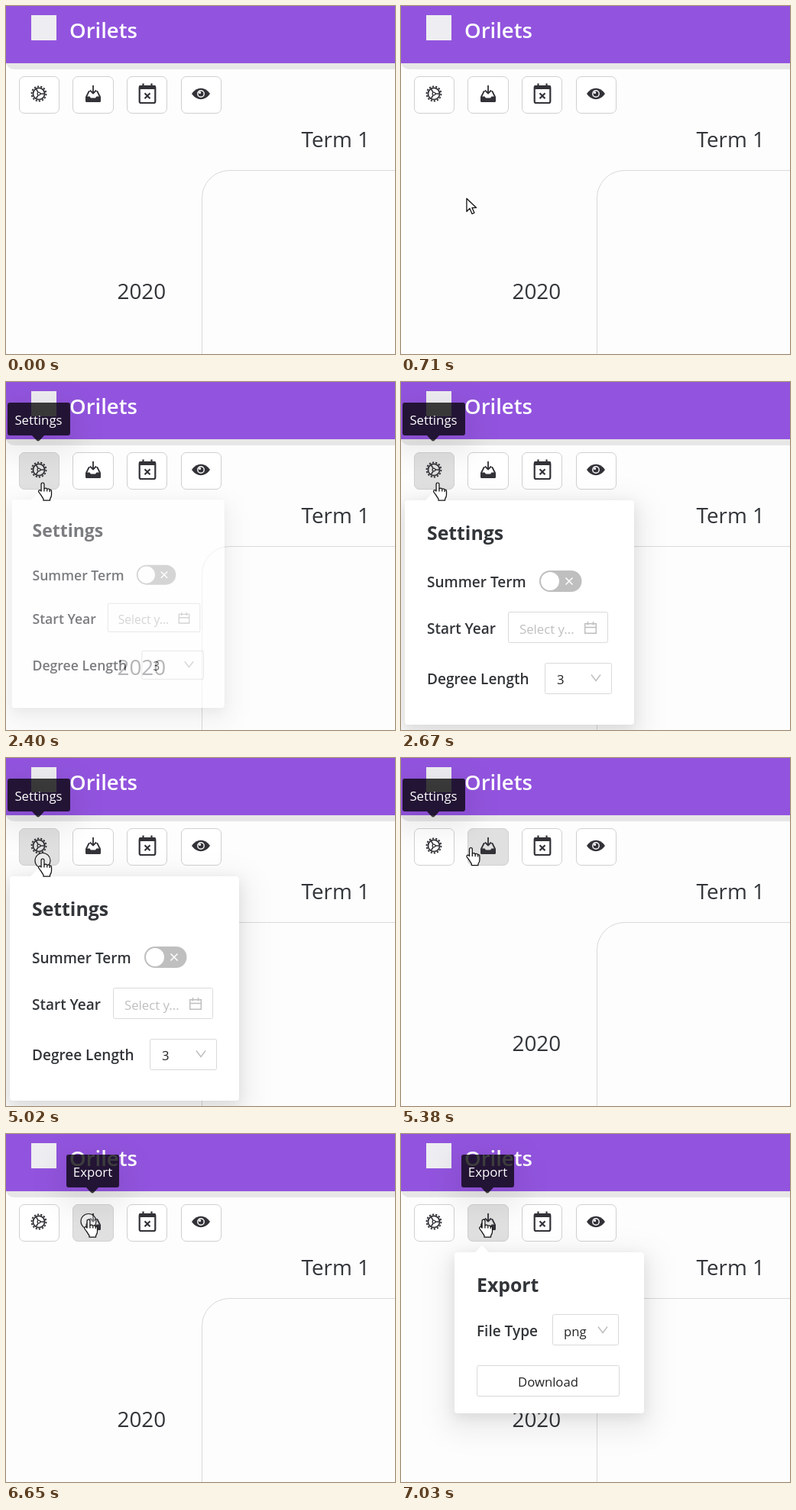
An HTML page for the animation above (8 s loop, 509 by 456 pixels).

```html
<!DOCTYPE html>
<html lang="en">
<head>
<meta charset="utf-8">
<title>Term planner</title>
<style>
  html, body { margin: 0; width: 100%; height: 100%; overflow: hidden; background: #fdfdfd; }
  svg { display: block; width: 100%; height: 100%; font-family: "Open Sans", "Noto Sans", sans-serif; }
  text { fill: #323539; }
  .brand { font-size: 27.5px; font-weight: 600; fill: #fff; }
  .grid { font-size: 27.8px; }
  .title { font-size: 24.8px; font-weight: 700; }
  .label { font-size: 19px; font-weight: 600; }
  .value { font-size: 16.7px; fill: #222; }
  .hint { font-size: 16.8px; fill: #bfbfbf; }
  .tip text { font-size: 16.8px; fill: #fff; }
  .tip path { fill: rgba(0, 0, 0, .75); }
  .shadow { fill: rgba(0, 0, 0, .065); filter: blur(17px); }
  .card { fill: #fff; filter: drop-shadow(0 5px 8px rgba(0, 0, 0, .08)); }
  .field { fill: #fff; stroke: #d9d9d9; }
  .faint { fill: none; stroke: #bdbdbd; stroke-width: 1.4; }
  .button { fill: #fff; stroke: #d0d0d0; }
  .button.hover { fill: #e0e0e0; }
  .line { fill: none; stroke: #323238; stroke-width: 2.2; }
  .thin { stroke-width: 1.8; }
  .solid { fill: #323238; }
  .cursor path { fill: #fff; stroke: #111; stroke-width: 1.3; stroke-linejoin: round; }
</style>
</head>
<body>
<svg viewBox="0 0 509 456">
  <rect width="509" height="456" fill="#fdfdfd"/>
  <rect y="55" width="540" height="28" rx="10" fill="#e7e7e7"/>
  <rect width="509" height="75" fill="#9254de"/>
  <rect x="33" y="12" width="33" height="33" fill="#eeedf1"/>
  <text class="brand" x="83" y="42">Orilets</text>

  <rect x="256.5" y="215.5" width="400" height="400" rx="36" fill="#fdfdfd" stroke="#d9d9d9"/>
  <text class="grid" x="386.5" y="185">Term 1</text>
  <text class="grid" x="145.5" y="384">2020</text>

  <g id="buttons"></g>

  <!-- settings -->
  <g class="line thin" transform="translate(43 115)">
    <circle r="7.6"/>
    <circle r="9.5" pathLength="28" stroke-dasharray="1.1 .9"/>
    <circle r="1.9" stroke-width="1.4"/>
    <path d="M2 0H7M-1 -2L-3.6 -6.2M-1 2L-3.6 6.2" stroke-width="1.6"/>
  </g>
  <!-- export -->
  <path class="line thin" d="M114 104V114M110 110.500L114 114.500L118 110.500M109.500 112H108.500L105 119M118.500 112H119.500L123 119" stroke-linejoin="round"/>
  <path class="solid" d="M104 118.500H109.500L111 120.500H117L118.500 118.500H124V124.500Q124 126 122.500 126H105.500Q104 126 104 124.500Z"/>
  <!-- clear calendar -->
  <rect class="line" x="174.700" y="105" width="20.600" height="22" rx="2"/>
  <path class="line" d="M179.500 101.500V107M190.500 101.500V107M181.500 114.200L188.500 121.200M188.500 114.200L181.500 121.200"/>
  <rect class="solid" x="174" y="104" width="22" height="5" rx="1.500"/>
  <!-- visibility -->
  <path class="solid" d="M243 115Q248 107.800 255 107.800T267 115Q262 122.300 255 122.300T243 115Z"/>
  <circle cx="255" cy="115" r="4.900" fill="#fff"/>
  <circle class="solid" cx="255" cy="115" r="3.500"/>
  <circle cx="253.600" cy="113.400" r="1.500" fill="#fff"/>

  <g id="settingsPop">
    <rect class="shadow" x="-7" y="155" width="324" height="318" rx="16"/>
    <path class="card" d="M9 155H32L41 146L50 155H301Q305 155 305 159V445Q305 449 301 449H9Q5 449 5 445V159Q5 155 9 155Z"/>
    <text class="title" x="34" y="207">Settings</text>
    <text class="label" x="34" y="269">Summer Term</text>
    <rect x="181" y="247" width="55.500" height="28" rx="14" fill="#bfbfbf"/>
    <circle cx="195" cy="261" r="12" fill="#fff"/>
    <path d="M215.500 256.500L224.500 265.500M224.500 256.500L215.500 265.500" stroke="#fff" stroke-width="1.5"/>
    <text class="label" x="34" y="330">Start Year</text>
    <rect class="field" x="140.500" y="301.500" width="130" height="40" rx="2"/>
    <text class="hint" x="155" y="330">Select y...</text>
    <path class="faint" d="M240.700 316.700H255.300V329.300H240.700ZM240.700 321.500H255.300M244.500 314V318.500M251.500 314V318.500"/>
    <text class="label" x="34" y="396">Degree Length</text>
    <rect class="field" x="188.500" y="368.500" width="87" height="40" rx="2"/>
    <text class="value" x="204" y="396">3</text>
    <path class="faint" d="M249 383.500L255 391.500L261 383.500"/>
  </g>

  <g id="exportPop">
    <rect class="shadow" x="58" y="155" width="272" height="235" rx="16"/>
    <path class="card" d="M74 155H97L106 146L115 155H314Q318 155 318 159V362Q318 366 314 366H74Q70 366 70 362V159Q70 155 74 155Z"/>
    <text class="title" x="99" y="207">Export</text>
    <text class="label" x="99" y="265">File Type</text>
    <rect class="field" x="198.500" y="236.500" width="86" height="40" rx="2"/>
    <text class="value" x="213" y="265">png</text>
    <path class="faint" d="M258 252.500L264 260.500L270 252.500"/>
    <rect class="field" x="99.500" y="303.500" width="186" height="40" rx="2"/>
    <text class="value" x="192.500" y="331" text-anchor="middle">Download</text>
  </g>

  <g class="tip" id="settingsTip">
    <rect class="shadow" x="-10" y="27" width="106" height="67" rx="16"/>
    <path d="M5 27H81Q84 27 84 30V67Q84 70 81 70H50L44 76.500Q42 78.500 40 76.500L34 70H5Q2 70 2 67V30Q2 27 5 27Z"/>
    <text x="42.500" y="56" text-anchor="middle">Settings</text>
  </g>
  <g class="tip" id="exportTip">
    <rect class="shadow" x="67" y="27" width="93" height="67" rx="16"/>
    <path d="M82 27H145Q148 27 148 30V67Q148 70 145 70H121L115 76.500Q113 78.500 111 76.500L105 70H82Q79 70 79 67V30Q79 27 82 27Z"/>
    <text x="113.500" y="56" text-anchor="middle">Export</text>
  </g>

  <g class="cursor" id="cursor">
    <circle id="ring" cy="2.500" r="10" fill="rgba(255,255,255,.35)" stroke="#222" stroke-width="1.2"/>
    <path id="arrow" d="M0 0v17l4-4l3 7l3-1.300l-3-6.700h5.500z"/>
    <g id="hand" transform="scale(.96)">
      <path d="M-2 2a2 2 0 0 1 4 0v6q2.500-1.500 4 .6q2.500-1 3.700 .9q2.300-.5 2.300 2v5q0 3-2 5.500v2h-9v-2q-2-3-3.500-5.500l-3-4q-.5-2.500 1.500-2.500q1 0 2 1.500z"/>
      <path d="M2 8v4M6 8.600v3.500M9.700 9.500v3"/>
    </g>
  </g>
</svg>
<script>
const LOOP = 8000;
const $ = id => document.getElementById(id);
const progress = (t, start, end) => Math.min(1, Math.max(0, (t - start) / (end - start)));
const smooth = p => p * p * (3 - 2 * p);
const circOut = p => Math.sqrt(1 - (1 - p) ** 2);
const show = (el, on) => el.style.display = on ? "" : "none";

const buttons = [17.5, 87.5, 158.5, 229.5].map(x => {
  const rect = document.createElementNS("http://www.w3.org/2000/svg", "rect");
  const shape = { class: "button", x, y: 92.5, width: x === 87.5 ? 53 : 52, height: 48, rx: 6.5 };
  for (const key in shape) rect.setAttribute(key, shape[key]);
  $("buttons").append(rect);
  return { rect, x };
});

// Overlays zoom in from, and back to, the tip of their pointer.
const overlays = [
  { id: "settingsPop", x: 41, y: 146, open: [2330, 2640], close: [5110, 5330] },
  { id: "exportPop", x: 106, y: 146, open: [6740, 7020] },
  { id: "settingsTip", x: 42, y: 78, open: [930, 1035], close: [5460, 5560] },
  { id: "exportTip", x: 113, y: 78, open: [5500, 5610] }
];
const clicks = [2210, 5020, 6650];
const path = [
  { from: [142, 430], to: [48, 132], time: [440, 920] },
  { from: [48, 132], to: [108, 112], time: [5100, 5530] }
];

function drawOverlay({ id, x, y, open, close }, t) {
  const el = $(id);
  const p = circOut(progress(t, ...open)) * (close ? 1 - smooth(progress(t, ...close)) : 1);
  show(el, p > 0);
  const scale = .8 + .2 * p;
  el.setAttribute("opacity", p);
  el.setAttribute("transform", `translate(${x} ${y}) scale(${scale}) translate(${-x} ${-y})`);
}

function draw(t) {
  const { from, to, time } = path[t < path[1].time[0] ? 0 : 1];
  const p = smooth(progress(t, ...time));
  const [x, y] = from.map((a, i) => a + (to[i] - a) * p);
  const visible = t >= path[0].time[0];

  let hovering = false;
  for (const button of buttons) {
    const over = visible && y < 141 && x >= button.x && x <= button.x + 53;
    button.rect.classList.toggle("hover", over);
    hovering ||= over;
  }
  overlays.forEach(overlay => drawOverlay(overlay, t));

  show($("cursor"), visible);
  show($("hand"), hovering);
  show($("arrow"), !hovering);
  show($("ring"), clicks.some(c => t >= c && t < c + 110));
  $("cursor").setAttribute("transform", `translate(${x} ${y})`);
}

const start = performance.now();
function tick() {
  draw((performance.now() - start) % LOOP);
  requestAnimationFrame(tick);
}
tick();
</script>
</body>
</html>
```
